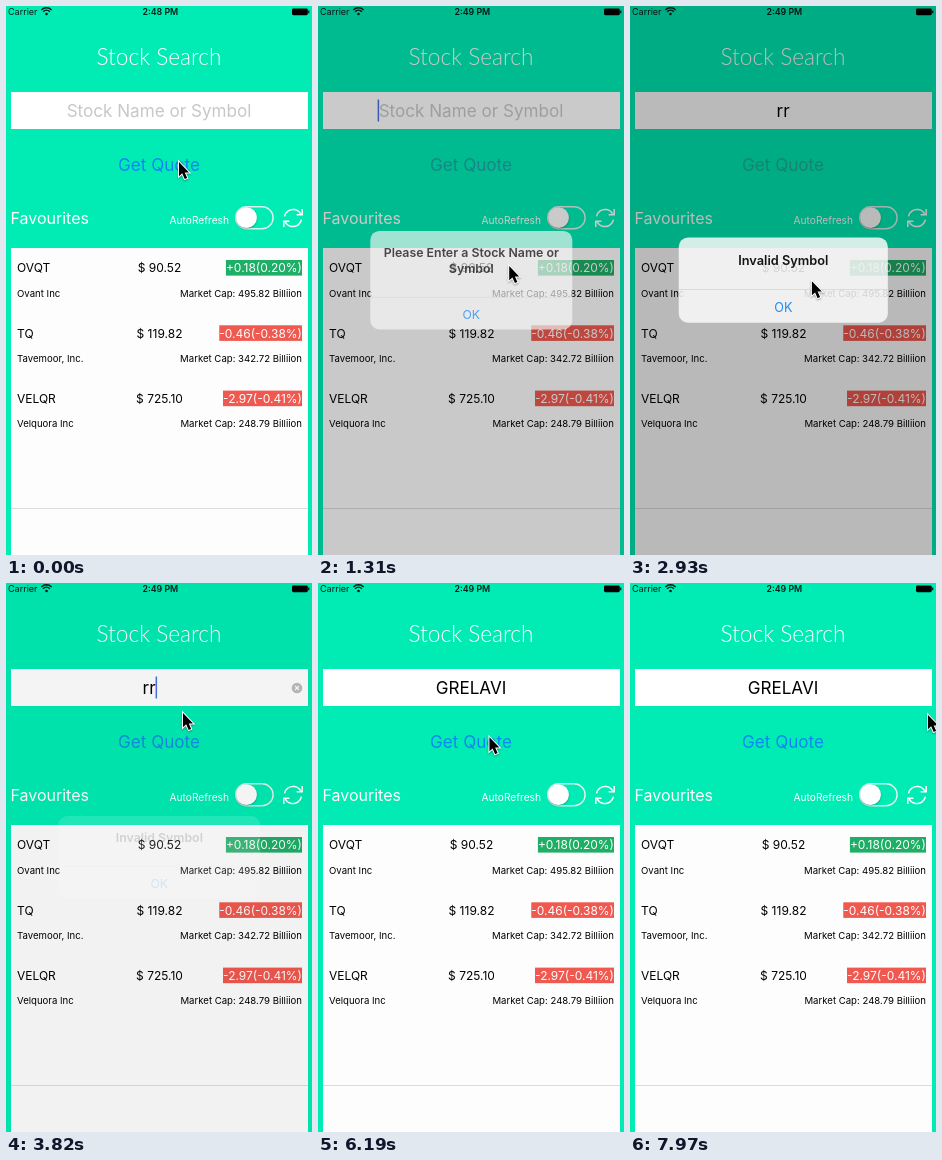
Animation of 306x549 px, one loop 8000 ms. Source, as an HTML page with a canvas:

```html
<!DOCTYPE html>
<html lang="en">
<head>
<meta charset="utf-8">
<title>Stock Search</title>
<style>
  html, body { margin: 0; width: 100%; height: 100%; overflow: hidden; background: #00ecb4; }
  canvas { display: block; width: 306px; height: 549px; }
</style>
</head>
<body>
<canvas id="stage"></canvas>
<script>
const W = 306, H = 549, LOOP = 8000, STEP = 147.9, LEAD = 28;
const TEAL = '#00ecb4', CARET = '#4a72e0', MID = 153, PICK = 'GRELAVI';
const SANS = 'Inter, sans-serif', SOFT = 'Lato, sans-serif';

const canvas = document.getElementById('stage');
const ctx = canvas.getContext('2d');
const ratio = window.devicePixelRatio || 1;
canvas.width = W * ratio;
canvas.height = H * ratio;

const spots = {
  quote: [173, 156], ok: [160, 308], field: [177, 130],
  list: [189, 129], item: [160, 147], away: [298, 132]
};

// Pointer journeys: start, end, destination
const moves = [
  [230, 650, 'ok'], [1160, 1580, 'field'], [1900, 2300, 'quote'],
  [2636, 3056, 'ok'], [3540, 3810, 'field'], [4750, 5290, 'list'],
  [5350, 5650, 'item'], [5900, 6300, 'quote'], [6593, 7013, 'ok'], [7300, 7950, 'away']
];

const alerts = [
  { open: 230, close: 1153, lines: ['Please Enter a Stock Name or', 'Symbol'] },
  { open: 2726, close: 3540, lines: ['Invalid Symbol'] },
  { open: 6720, close: 7250, lines: ['No detail stock data of this', 'company'] }
];

const stocks = [
  ['OVQT', '$ 90.52', '+0.18(0.20%)', 'Ovant Inc', '495.82'],
  ['TQ', '$ 119.82', '-0.46(-0.38%)', 'Tavemoor, Inc.', '342.72'],
  ['VELQR', '$ 725.10', '-2.97(-0.41%)', 'Velquora Inc', '248.79']
];

const matches = [
  PICK + ' - TRUV OLB GREL VI - TRU…',
  PICK + 'X - TRUV OLB GRELVTR - T…',
  'GZ - Grelovick Inc - VXQE',
  'GZM - Gretillor Companies Inc - VXQE'
];

const within = (t, from, to) => t >= from && t < to;
const progress = (t, from, to) => Math.min(1, Math.max(0, (t - from) / (to - from)));
const smooth = p => p * p * (3 - 2 * p);
const mix = (a, b, p) => a + (b - a) * p;
const typing = (word, t, start, pace) => word.slice(0, Math.max(0, Math.ceil((t - start) / pace)));

function pointerAt(t) {
  let [x, y] = spots.quote;
  for (const [start, end, name] of moves) {
    if (t < start) break;
    const p = smooth(progress(t, start, end));
    const [toX, toY] = spots[name];
    // Long vertical journeys swing out to the right.
    const bow = Math.abs(toY - y) / 5 * Math.sin(Math.PI * p);
    x = mix(x, toX, p) + bow;
    y = mix(y, toY, p);
  }
  return [x, y];
}

function alertAt(t) {
  for (const { open, close, lines } of alerts) {
    const shown = progress(t, open, open + 300) - progress(t, close, close + 310);
    if (shown > 0) return { lines, shown, scale: t < close ? 1 + .11 * (1 - shown) : 1 };
  }
  return { shown: 0 };
}

function fieldText(t) {
  if (t < 4050) return typing('rr', t, 1700, 150);
  return t < 5900 ? typing('gre', t, 4400, 220) : PICK;
}

function setFont(size, weight = 400, family = SANS) {
  ctx.font = `${weight} ${size}px ${family}`;
}

function label(text, x, y, color, align = 'left') {
  ctx.textAlign = align;
  ctx.fillStyle = color;
  ctx.fillText(text, x, y);
}

function rect(x, y, w, h, color) {
  ctx.fillStyle = color;
  ctx.fillRect(x, y, w, h);
}

function disc(x, y, r, color) {
  ctx.fillStyle = color;
  ctx.beginPath();
  ctx.arc(x, y, r, 0, Math.PI * 2);
  ctx.fill();
}

function pill(x, y, w, h, r) {
  ctx.beginPath();
  ctx.roundRect(x, y, w, h, r);
}

function line(points, color, width) {
  ctx.strokeStyle = color;
  ctx.lineWidth = width;
  ctx.beginPath();
  points.forEach(([x, y]) => ctx.lineTo(x, y));
  ctx.stroke();
}

function arc(x, y, r, from, to, color, width) {
  ctx.strokeStyle = color;
  ctx.lineWidth = width;
  ctx.beginPath();
  ctx.arc(x, y, r, from * Math.PI, to * Math.PI);
  ctx.stroke();
}

function softShadow(alpha) {
  ctx.shadowColor = `rgba(0,0,0,${alpha})`;
  ctx.shadowBlur = 2 * ratio;
  ctx.shadowOffsetY = ratio;
}

function statusBar(t) {
  setFont(9);
  label('Carrier', 2, 9, '#061c17');
  for (const r of [7.2, 4.7]) arc(40.5, 9, r, 1.25, 1.75, '#061c17', 1.4);
  disc(40.5, 8, 1.3, '#061c17');
  setFont(8.8, 600);
  label(t < 700 ? '2:48 PM' : '2:49 PM', 154.3, 9, '#061c17', 'center');
  ctx.fillStyle = '#000';
  pill(286, 2.6, 15.8, 6.6, 1.4);
  ctx.fill();
  rect(302.2, 4.5, 1.1, 2.8, '#000');
}

function searchField(t) {
  const text = fieldText(t);
  const focused = within(t, 1250, 2560) || within(t, 3600, 5900);
  const clearable = focused && text !== '';
  const center = clearable ? 143 : MID;
  rect(5, 86, 297, 37, '#fff');
  setFont(17.1);
  const shown = text || 'Stock Name or Symbol';
  label(shown, center, 111, text ? '#000' : '#c7c7cc', 'center');
  if (focused) {
    const half = ctx.measureText(shown).width / 2;
    rect(text ? center + half : center - half - 1, 93.5, 1.5, 22, CARET);
  }
  if (clearable) {
    disc(291, 105, 5.3, '#bcbcc0');
    line([[289, 103], [293, 107]], '#fff', 1.1);
    line([[293, 103], [289, 107]], '#fff', 1.1);
  }
}

function toggle() {
  ctx.strokeStyle = '#d9f3ec';
  ctx.lineWidth = 1.5;
  pill(229.7, 200.7, 37.4, 22, 11);
  ctx.stroke();
  ctx.save();
  softShadow(.3);
  disc(240.5, 211.7, 10.4, '#fff');
  ctx.restore();
}

function refreshIcon() {
  ctx.save();
  ctx.translate(287, 212);
  for (let i = 0; i < 2; i++) {
    arc(0, 0, 8.6, 1.06, 1.88, '#fff', 1.5);
    line([[9.2, -9], [9.2, -3.2], [3.6, -3.2]], '#fff', 1.5);
    ctx.rotate(Math.PI);
  }
  ctx.restore();
}

function header(t, muted) {
  statusBar(t);
  setFont(22.7, 300, SOFT);
  label('Stock Search', MID, 58.5, '#fff', 'center');
  searchField(t);
  setFont(17.1);
  const tint = `rgb(${mix(15, 32, muted)}, ${mix(135, 182, muted)}, ${mix(240, 145, muted)})`;
  label('Get Quote', MID, 165, tint, 'center');
  setFont(16);
  label('Favourites', 4.5, 217.8, '#fff');
  setFont(10.2);
  label('AutoRefresh', 223, 218.3, '#fff', 'right');
  toggle();
  refreshIcon();
}

function stockRow([symbol, price, change, company, cap], i) {
  const y = 266.3 + i * 65.3;
  setFont(12);
  label(symbol, 11, y, '#000');
  label(price, MID + .5, y, '#000', 'center');
  const w = ctx.measureText(change).width;
  rect(296 - w, y - 12.3, w, 15.6, change[0] === '+' ? '#1fae66' : '#f0594f');
  label(change, 296, y, '#fff', 'right');
  setFont(9.6);
  label(company, 11, y + 24.2, '#000');
  label(`Market Cap: ${cap} Billiion`, 296, y + 24.2, '#000', 'right');
}

function favourites() {
  rect(5, 242, 297, 307, '#fdfdfd');
  stocks.forEach(stockRow);
  rect(5, 502, 297, 1, '#dcdcde');
}

function dropdown() {
  rect(5, 123, 297, 118, '#fff');
  rect(5, 241, 297, 1, '#62e8c8');
  rect(5, 242, 297, 66, 'rgba(255,255,255,.7)');
  setFont(13.3, 400, SOFT);
  matches.forEach((text, i) => label(text, 11, 150 + i * 45, '#848484'));
}

function alertBox({ lines, shown, scale }) {
  const alpha = Math.min(1, shown * 1.35);
  const w = 202, h = 66 + lines.length * 16.3;
  const top = -h / 2, bottom = h / 2;
  ctx.save();
  ctx.translate(MID + .3, 274.2);
  ctx.scale(scale, scale);
  ctx.globalAlpha = alpha * .92;
  ctx.fillStyle = '#fbfbfb';
  pill(-w / 2, top, w, h, 9);
  ctx.fill();
  ctx.globalAlpha = alpha;
  rect(-w / 2, bottom - 32.6, w, .7, '#d2d2d6');
  setFont(12.35, 600);
  lines.forEach((text, i) => label(text, 0, top + 26.2 + i * 16.2, '#000', 'center'));
  setFont(12.2);
  label('OK', 0, bottom - 10.8, '#0a82f5', 'center');
  ctx.restore();
}

function pointer([x, y]) {
  const shape = [[0, 0], [0, 14.2], [3.2, 11.3], [5.7, 17], [8.2, 15.9], [5.7, 10.4], [10, 10.4]];
  ctx.save();
  ctx.translate(x, y);
  softShadow(.35);
  ctx.beginPath();
  shape.forEach(([px, py]) => ctx.lineTo(px, py));
  ctx.closePath();
  ctx.strokeStyle = '#fff';
  ctx.lineWidth = 2;
  ctx.stroke();
  ctx.shadowColor = 'transparent';
  ctx.fillStyle = '#000';
  ctx.fill();
  ctx.restore();
}

function draw(time) {
  // The screen refreshes in coarse, even steps.
  const step = Math.floor((time % LOOP + LEAD) / STEP);
  const t = Math.max(0, step * STEP - LEAD);
  const alert = alertAt(t);
  ctx.setTransform(ratio, 0, 0, ratio, 0, 0);
  rect(0, 0, W, H, TEAL);
  header(t, Math.min(1, alert.shown * 1.4));
  favourites();
  if (within(t, 5100, 5900)) dropdown();
  if (alert.shown) {
    rect(0, 0, W, H, `rgba(0,0,0,${.4 * alert.shown})`);
    alertBox(alert);
  }
  pointer(pointerAt(t));
}

const start = performance.now();
function tick() {
  draw(performance.now() - start);
  requestAnimationFrame(tick);
}
tick();
</script>
</body>
</html>
```
